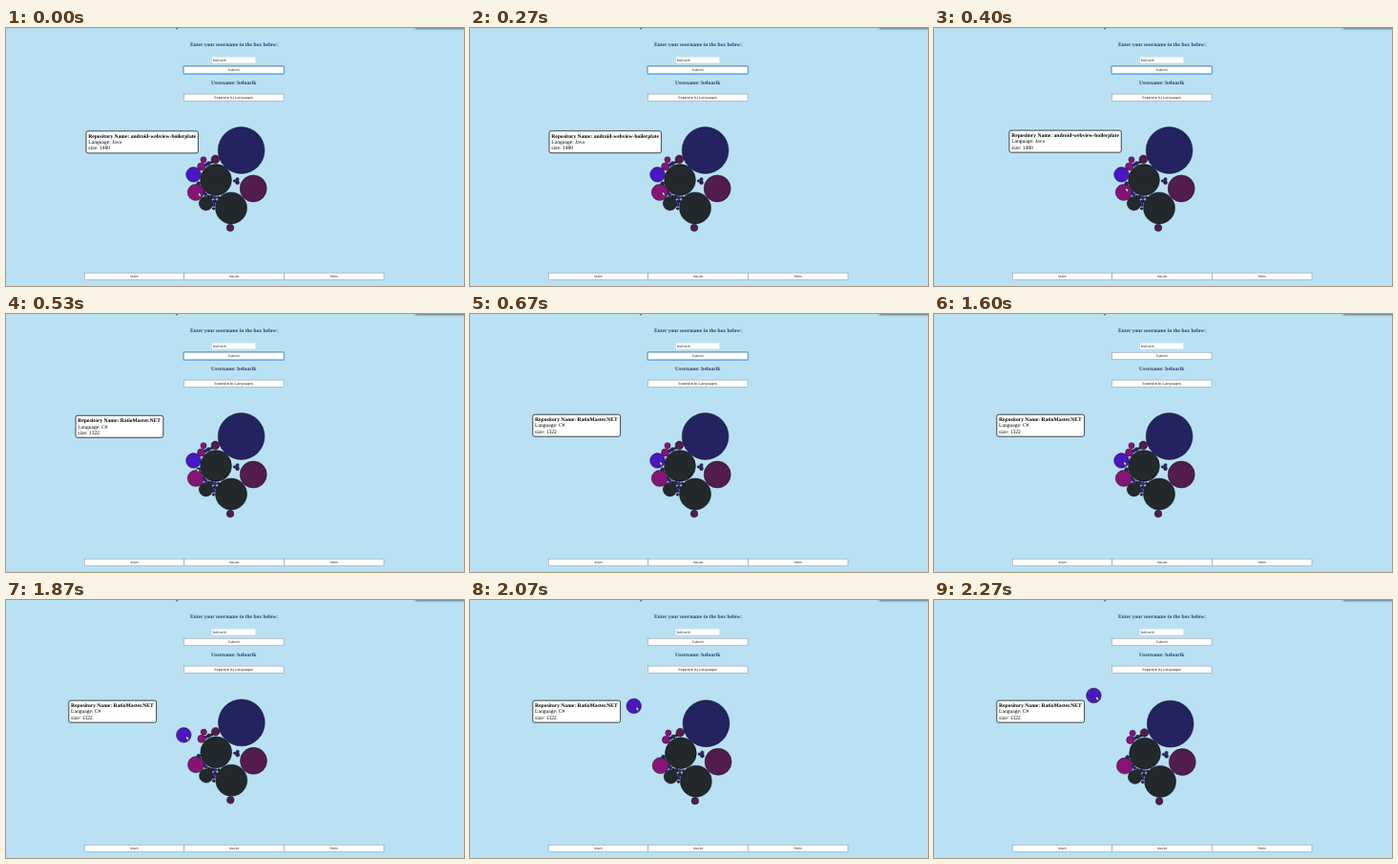
These frames come from a looping animation (480x270 px, 2.34 s). An HTML page:

```html
<!DOCTYPE html>
<html lang="en">
<head>
<meta charset="utf-8">
<title>Repository bubbles</title>
<style>
  html, body { margin: 0; width: 100%; height: 100%; overflow: hidden; background: #b9e1f3; }
  svg { display: block; width: 480px; height: 270px; }
  text { font: 5.55px "Liberation Serif", "Times New Roman", serif; text-rendering: geometricPrecision; }
  .bold { font-weight: bold; }
  .mid { text-anchor: middle; }
  .head { fill: #2d3d78; }
  .ui { font: 3.45px "DejaVu Sans", Verdana, sans-serif; fill: #222; }
  .button { fill: #fff; stroke: #7f8d95; stroke-width: .5; }
  circle { stroke: #0b0b14; stroke-width: .45; }
</style>
</head>
<body>
<svg viewBox="0 0 480 270">
  <defs>
    <filter id="soft" x="-20%" y="-200%" width="140%" height="500%"><feGaussianBlur stdDeviation="1"/></filter>
  </defs>
  <rect x="428" y="-6" width="60" height="7" rx="3" fill="#5d707c" filter="url(#soft)"/>
  <path d="M180.7 -1L179.5 .7Q179 1.2 178 .8" fill="none" stroke="#27304f" stroke-width=".9"/>

  <text class="bold mid head" x="239" y="19.3">Enter your username in the box below:</text>
  <rect x="215.7" y="30.2" width="46" height="6.6" fill="#fff" stroke="#cfdde3" stroke-width=".5"/>
  <text class="ui" x="217" y="34.8">belnarik</text>
  <text class="bold mid head" x="238.7" y="58.7">Username: belnarik</text>
  <rect id="ring" x="186" y="39.7" width="105.4" height="8.6" rx="1" fill="none" stroke="#68a8ef" stroke-width="1.5"/>
  <g id="buttons"></g>
  <g id="cluster"></g>
  <circle id="ball" r="7.8" fill="#4a17c2"/>

  <g id="tip">
    <rect id="box" height="23" rx="2" fill="#fff" stroke="#14181a" stroke-width=".8"/>
    <text class="bold" x="2.3" y="7"></text>
    <text x="2.3" y="13.3"></text>
    <text x="2.3" y="19.5"></text>
  </g>
  <path id="hand" d="M0 0L.3 4.2L1.2 3.5L2 5.2L3 4.8L2.3 3.2L3.6 3Z" fill="#f4f4f4" stroke="#111" stroke-width=".55"/>
</svg>
<script>
const $ = id => document.getElementById(id);
const LOOP = 2340, STEPS = 35, STEP = LOOP / STEPS;
const dark = '#22282b', navy = '#23235f', plum = '#521d4e', pink = '#861477', blue = '#3a20a2';

const button = (x, y, label) =>
  `<rect class="button" x="${x}" y="${y}" width="104.6" height="7.5"/>` +
  `<text class="ui mid" x="${x + 52.3}" y="${y + 5.1}">${label}</text>`;
$('buttons').innerHTML =
  button(186.4, 40.2, 'Submit') + button(186.4, 69.1, 'Seperate by Languages') +
  ['stars', 'issues', 'forks'].map((s, i) => button(82.2 + i * 104.6, 256.2, s)).join('');

const bubble = (x, y, r, fill) => `<circle cx="${x}" cy="${y}" r="${r}" fill="${fill}"/>`;

// Tiny bubbles packed along an arc, angles in degrees
function arc(x, y, dist, from, to, count) {
  return Array.from({ length: count }, (_, i) => {
    const a = (from + (to - from) * i / (count - 1)) * Math.PI / 180;
    return bubble(x + dist * Math.cos(a), y + dist * Math.sin(a), 1.3 + i % 3 * .35, [dark, blue, navy][i % 3]);
  }).join('');
}

$('cluster').innerHTML =
  arc(220, 159, 18.6, 82, 168, 9) + arc(236, 188.4, 18.5, 178, 202, 3) +
  arc(220, 159, 19, 226, 256, 4) + arc(241.5, 160, 2, 180, 420, 3) +
  bubble(246.6, 128, 24.4, navy) + bubble(220, 159, 16.4, dark) + bubble(236, 188.4, 16.5, dark) +
  bubble(259.2, 168, 14, plum) + bubble(198.8, 172, 8.5, pink) + bubble(209.6, 183.6, 7.3, dark) +
  bubble(235, 209, 3.8, plum) + bubble(219.4, 137.4, 4.3, plum) +
  bubble(204.6, 145, 4, pink) + bubble(207, 137.8, 3.1, pink);

const clamp = u => Math.min(1, Math.max(0, u));
const smooth = u => u * u * (3 - 2 * u);
const lerp = (a, b, u) => a + (b - a) * u;
const move = (id, x, y) => $(id).setAttribute('transform', `translate(${x} ${y})`);

const repos = [
  [117.4, 'android-webview-boilerplate', 'Java', 1480],
  [91.8, 'RatioMaster.NET', 'C#', 1322]
];
const lines = document.querySelectorAll('#tip text');

function draw(ms) {
  const n = Math.floor((ms % LOOP + 5) / STEP) % STEPS;

  // The pointer crosses to the next bubble and the tooltip follows
  const hover = clamp((n - 3) / 7) ** 1.5;
  const [width, name, language, size] = repos[n < 8 ? 0 : 1];
  $('box').setAttribute('width', width);
  ['Repository Name: ' + name, 'Language: ' + language, 'size: ' + size]
    .forEach((s, i) => lines[i].textContent = s);
  move('tip', lerp(84, 65.8, hover), lerp(107.9, 105.2, hover));

  // Dragging pulls the ball away, with a one-step pause near the end
  const drag = smooth(clamp((n - (n > 31) - 24) / 9));
  const across = drag ** 1.2, up = drag ** 1.7;
  const x = lerp(196.5, 167.4, across), y = lerp(153.4, 100, up);
  move('ball', x, y);
  move('hand', x + lerp(5, 2.3, hover), y + lerp(18.6, .6, hover));
  move('cluster', 1.1 * up, 1.6 * up);
  $('ring').style.display = n < 24 ? '' : 'none';
}

let start;
function tick(now) {
  start ??= now;
  draw(now - start);
  requestAnimationFrame(tick);
}
draw(0);
requestAnimationFrame(tick);
</script>
</body>
</html>
```
